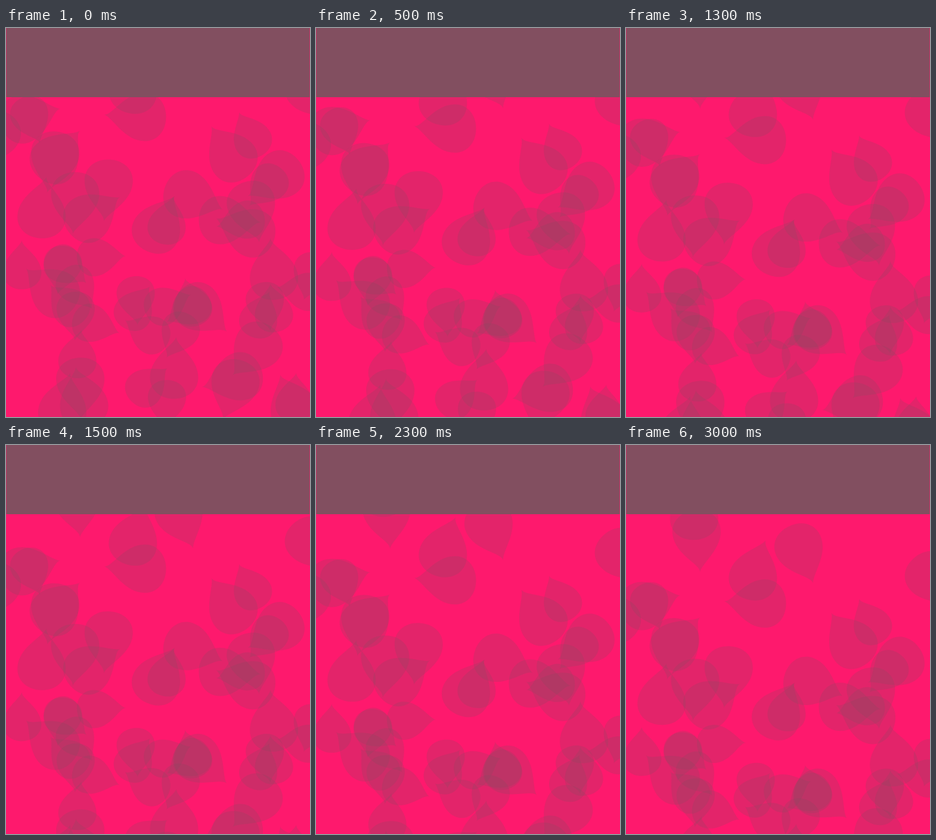
An HTML page that plays this animation: 510x652 px, repeating every 3.5 s.

```html
<!DOCTYPE html>
<html lang="en">
<head>
<meta charset="utf-8">
<title>Falling petals</title>
<style>
  html, body { margin: 0; width: 100%; height: 100%; overflow: hidden; background: #fe196d; }
  svg { display: block; width: 510px; height: 652px; }
</style>
</head>
<body>
<svg viewBox="0 0 510 652">
  <defs>
    <!-- Petal of width 1 with its tip up -->
    <path id="petal" d="M.05-.78C.02-.62 .5-.36 .5 .06C.5 .32 .29 .5 0 .5C-.29 .5-.5 .32-.5 .06C-.5-.36-.02-.6 .05-.78Z"/>
  </defs>
  <g id="petals" fill="#824f60" fill-opacity=".21"></g>
  <rect x=".5" width="509" height="116" fill="#824f60"/>
</svg>
<script>
const LOOP = 3500, STEP = 500, DROP = 19.45;
const layer = document.getElementById('petals');

function petal(x, y, size, tilt) {
  const leaf = document.createElementNS('http://www.w3.org/2000/svg', 'use');
  leaf.setAttribute('href', '#petal');
  leaf.setAttribute('transform', `translate(${x} ${y}) rotate(${tilt}) scale(${size})`);
  layer.append(leaf);
}

// The tilt sweeps one full turn over the centres, lingering at up and down.
function scatter(size, centres) {
  centres.forEach(([x, y], i) => {
    const turn = 2 * Math.PI * i / centres.length;
    const tilt = turn - 0.35 * Math.sin(2 * turn);
    petal(x, y, size, tilt * 180 / Math.PI);
  });
}

scatter(81, [
  [282, 581], [60, 312], [95, 640], [214, 103], [253, 337], [82, 220], [138, 318], [30, 152],
  [364, 322], [305, 280], [322, 468], [510, 103], [291, 56], [412, 297], [119, 33], [125, 593],
  [116, 282], [172, 261], [82, 214], [384, 596], [-17, 178], [422, 534], [459, 247], [390, 585],
  [228, 149], [411, 343], [82, 444], [380, 217], [483, 640], [130, 630], [449, 415], [114, 2]
]);
scatter(64, [
  [484, 628], [120, 555], [270, 331], [424, 488], [214, 475], [233, 603], [264, 466], [151, 384],
  [143, 495], [96, 396], [117, 430], [40, 146], [435, 458], [218, 448], [117, 474], [270, 622],
  [95, 397], [514, 408], [292, 508], [441, 260], [312, 466], [402, 322], [504, 442], [243, 514],
  [108, 468], [413, 186], [313, 468], [449, 478], [27, 406]
]);

function draw(now) {
  const step = Math.floor(now % LOOP / STEP);
  layer.setAttribute('transform', `translate(0 ${step * DROP})`);
  requestAnimationFrame(draw);
}
draw(performance.now());
</script>
</body>
</html>
```
